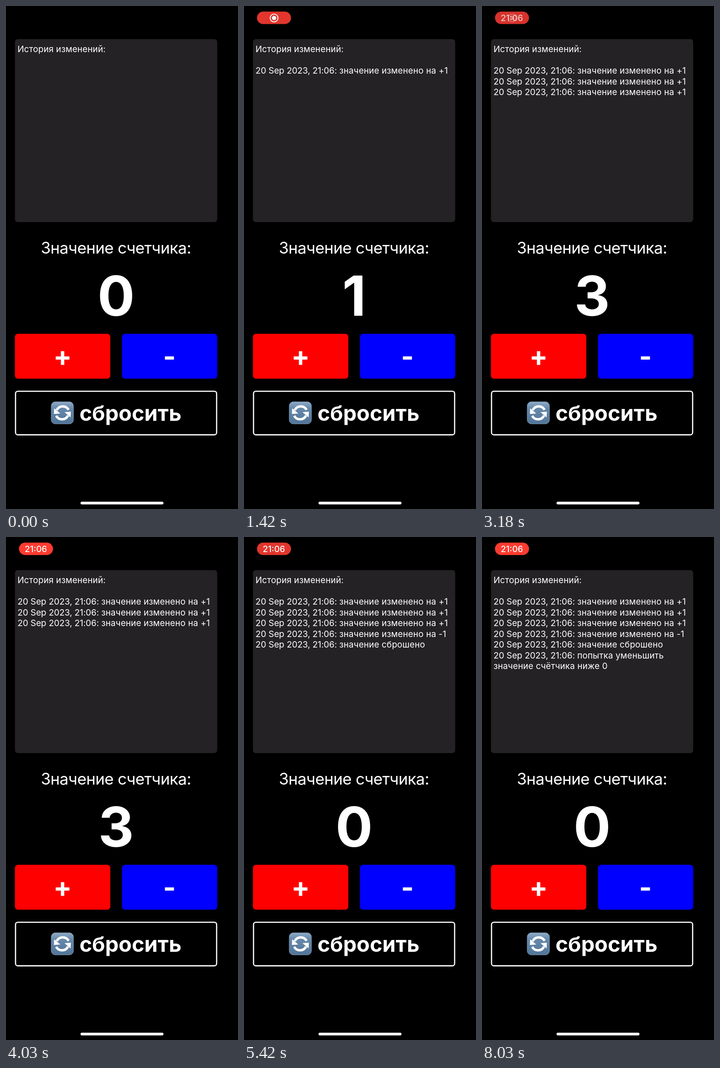
Animation of 509x1101 px, one loop 8.09 s. Source, as an HTML page:

```html
<!DOCTYPE html>
<html lang="ru">
<head>
<meta charset="utf-8">
<title>Счетчик</title>
<style>
  html, body { margin: 0; width: 100%; height: 100%; overflow: hidden; background: #000; }
  svg { display: block; width: 100vw; height: 100vh; }
  text { font-family: Inter, "Open Sans", sans-serif; font-optical-sizing: none; fill: #fff; }
  .mid { text-anchor: middle; }
  .bold { font-weight: 700; }
  .log { font-size: 19px; letter-spacing: .1px; white-space: pre; }
  .stamp { letter-spacing: -.1px; }
</style>
</head>
<body>
<svg viewBox="0 0 509 1101">
  <defs>
    <linearGradient id="steel" x2="0" y2="1">
      <stop offset="0" stop-color="#8fabc6"/>
      <stop offset=".3" stop-color="#6688aa"/>
      <stop offset="1" stop-color="#527598"/>
    </linearGradient>
    <g id="arrow" fill="none" stroke="#fff">
      <path d="M13.6 -6.5A14.6 14.6 0 0 0 -12.4 -6" stroke-width="5.2"/>
      <path d="M-18 -10L-18.6 2.6L-4.6 1.4Z" fill="#fff" stroke="none"/>
    </g>
  </defs>

  <g id="pill">
    <rect id="pillBody" x="28.5" y="12.3" width="74.6" height="27.2" rx="13.6"/>
    <g id="recordIcon">
      <circle cx="66" cy="26.2" r="8.6" fill="none" stroke="#fff" stroke-width="1.9"/>
      <circle cx="66" cy="26.2" r="4.6" fill="#fff"/>
    </g>
    <text id="clock" class="mid" x="65.6" y="32.8" font-size="18.8" font-weight="500">21:06</text>
  </g>

  <rect x="19.6" y="72.4" width="443.8" height="400.6" rx="6.5" fill="#242225"/>
  <text class="log" x="25.2" y="101.4">История изменений:</text>
  <g id="history"></g>

  <text class="mid" x="241.2" y="542" font-size="35" letter-spacing="-.6">Значение счетчика:</text>
  <text id="counter" class="mid bold" x="241.5" y="678" font-size="121">0</text>

  <rect x="19.6" y="717.5" width="209.2" height="98.2" rx="6.5" fill="#f00"/>
  <rect x="254.4" y="717.5" width="209" height="98.2" rx="6.5" fill="#00f"/>
  <text id="plus" class="mid bold" x="124" font-size="60">+</text>
  <text id="minus" class="mid bold" x="358.5" font-size="60">-</text>

  <rect x="20.9" y="843.2" width="441.2" height="95.4" rx="5.2" fill="none" stroke="#fff" stroke-width="2.6"/>
  <g id="reset">
    <rect x="99.2" y="866.3" width="48.8" height="48.4" rx="9" fill="url(#steel)" stroke="#7f9cb8" stroke-width="1"/>
    <use href="#arrow" transform="translate(123.7 890.5)"/>
    <use href="#arrow" transform="translate(123.7 890.5) rotate(180)"/>
    <text class="bold" x="161.2" y="907.7" font-size="47">сбросить</text>
  </g>

  <rect x="163.5" y="1085" width="182" height="6" rx="3" fill="#fff"/>
</svg>
<script>
const LOOP = 8090, PRESS = 75, PILL_START = 30, PULSE = 2000, CLOCK_START = 3000, FADE = 250;
const LINE_HEIGHT = 23.45, FIRST_LINE = 148.3, BUTTON_CENTER = 770.4;
const stamp = '<tspan class="stamp">20 Sep 2023, 21:06: </tspan>';
const changed = stamp + 'значение изменено на ';

const events = [
  { at: 1280, button: 'plus', value: 1, lines: [changed + '+1'] },
  { at: 2050, button: 'plus', value: 2, lines: [changed + '+1'] },
  { at: 2900, button: 'plus', value: 3, lines: [changed + '+1'] },
  { at: 4130, button: 'minus', value: 2, lines: [changed + '-1'] },
  { at: 5210, button: 'reset', value: 0, lines: [stamp + 'значение сброшено'] },
  { at: 6860, button: 'minus', value: 0, lines: [stamp + 'попытка уменьшить', 'значение счётчика ниже 0'] }
];

const $ = id => document.getElementById(id);
const clamp = x => Math.min(1, Math.max(0, x));

// Build every history line once; time only decides which are visible.
let row = 0;
for (const event of events) {
  event.nodes = event.lines.map(line => {
    const node = document.createElementNS('http://www.w3.org/2000/svg', 'text');
    node.setAttribute('class', 'log');
    node.setAttribute('x', 25.2);
    node.setAttribute('y', FIRST_LINE + LINE_HEIGHT * row++);
    node.innerHTML = line;
    return $('history').appendChild(node);
  });
}

// Center the visible ink of the button signs vertically.
const pen = document.createElement('canvas').getContext('2d');
pen.font = '700 60px Inter, "Open Sans", sans-serif';
for (const id of ['plus', 'minus']) {
  const ink = pen.measureText($(id).textContent);
  $(id).setAttribute('y', BUTTON_CENTER + (ink.actualBoundingBoxAscent - ink.actualBoundingBoxDescent) / 2);
}

function render(t) {
  const dim = (1 - Math.cos((t - 30) / PULSE * 2 * Math.PI)) / 2;
  $('pill').style.display = t < PILL_START ? 'none' : '';
  $('pillBody').setAttribute('fill', `rgb(${255 - 43 * dim},${59 - 8 * dim},${48 - 4 * dim})`);
  const clock = clamp((t - CLOCK_START) / FADE);
  $('clock').style.opacity = clock;
  $('recordIcon').style.opacity = 1 - clock;

  let value = 0, pressed = '';
  for (const event of events) {
    const done = t >= event.at;
    if (done) value = event.value;
    else if (t >= event.at - PRESS) pressed = event.button;
    for (const node of event.nodes) node.style.display = done ? '' : 'none';
  }
  $('counter').textContent = value;
  for (const id of ['plus', 'minus', 'reset']) $(id).style.opacity = id === pressed ? .7 : 1;
}

const start = performance.now();
function tick() {
  render((performance.now() - start) % LOOP);
  requestAnimationFrame(tick);
}
tick();
</script>
</body>
</html>
```
